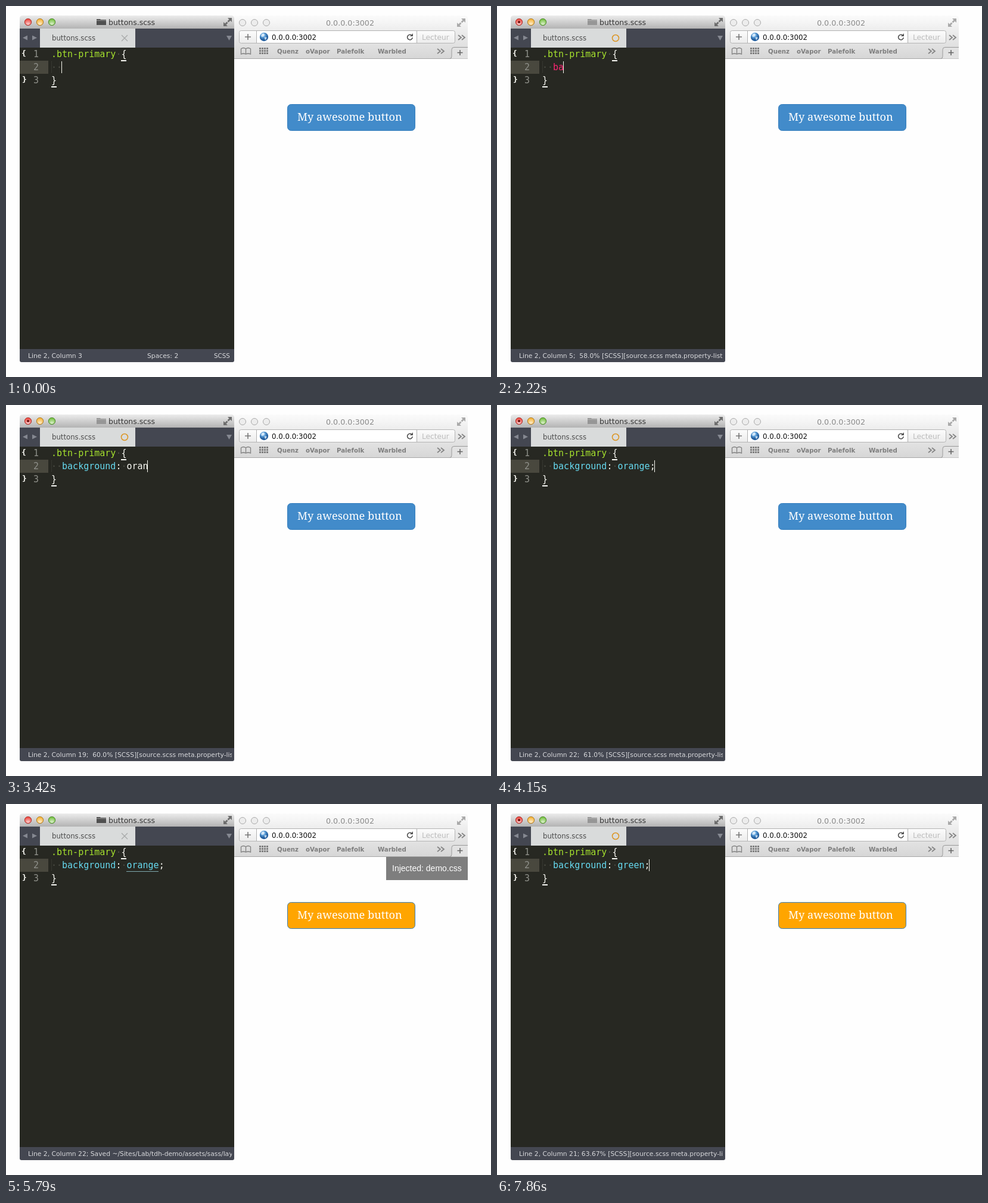
Animation, 814 px wide and 624 px high, one loop 8 s. Source, as an HTML page:

```html
<!DOCTYPE html>
<html lang="en">
<head>
<meta charset="utf-8">
<title>Live style injection</title>
<style>
  html, body { margin: 0; width: 100%; height: 100%; overflow: hidden; background: #fefefe; }
  svg { display: block; width: 814px; height: 624px; }
  text { white-space: pre; font-family: "DejaVu Sans", sans-serif; }
  .code text { font: 15px "DejaVu Sans Mono", monospace; fill: #f8f8f2; }
  .code .num { fill: #8f908a; }
  .code .fold { font-weight: bold; font-size: 13px; }
  .code .dot { fill: #4c4d45; }
  .sel { fill: #a6e22e; }
  .status { font-size: 10.75px; fill: #d8d9dc; }
  .marks { font-size: 10.2px; font-weight: bold; fill: #7d7d7d; }
  .line { fill: none; stroke: #808080; }
</style>
</head>
<body>
<svg viewBox="0 0 814 624">
  <defs>
    <linearGradient id="bar" x2="0" y2="1"><stop stop-color="#ececec"/><stop offset="1" stop-color="#b3b3b3"/></linearGradient>
    <linearGradient id="chrome" x2="0" y2="1"><stop stop-color="#fbfbfb"/><stop offset=".35" stop-color="#ededed"/><stop offset="1" stop-color="#d6d6d6"/></linearGradient>
    <linearGradient id="pill" x2="0" y2="1"><stop stop-color="#fcfcfc"/><stop offset="1" stop-color="#ececec"/></linearGradient>
    <radialGradient id="globe" cx=".4" cy=".3"><stop stop-color="#cfe6fa"/><stop offset=".5" stop-color="#5c9fd9"/><stop offset="1" stop-color="#245f9f"/></radialGradient>
    <radialGradient id="gloss" cy=".85" r=".8"><stop stop-color="#fff" stop-opacity=".75"/><stop offset="1" stop-color="#fff" stop-opacity="0"/></radialGradient>
    <path id="expand" d="M0-7h7v7l-2.5-2.5-3 3-2-2 3-3zM0 7h-7v-7l2.5 2.5 3-3 2 2-3 3z"/>
    <path id="more" d="M-6-4l5 4-5 4M0-4l5 4-5 4" fill="none" stroke="#858585" stroke-width="1.8"/>
    <clipPath id="statusClip"><path d="M23 577h356v22h-356z"/></clipPath>
  </defs>

  <!-- Browser -->
  <path d="M383 89V16H770q5 0 5 5V89z" fill="url(#chrome)"/>
  <path d="M383 88.5H775" stroke="#a6a6a6"/>
  <g fill="#ededed" stroke="#aaa">
    <circle cx="397" cy="28" r="5.5"/><circle cx="417" cy="28" r="5.5"/><circle cx="437" cy="28" r="5.5"/>
  </g>
  <text x="537" y="33" font-size="12.7" fill="#8b8b8b">0.0.0.0:3002</text>
  <use href="#expand" x="764" y="28" fill="#aaa"/>
  <rect x="391.5" y="41.5" width="362" height="21" rx="3" fill="url(#pill)" stroke="#b4b4b4"/>
  <path d="M421 42h269v20h-269z" fill="#fff"/>
  <path d="M420.500 42v20M689.500 42v20M421 41.500h269" stroke="#b0b0b0"/>
  <path d="M401 52h10M406 47v10" stroke="#777" stroke-width="1.6"/>
  <circle cx="433" cy="52" r="7.200" fill="url(#globe)"/>
  <path d="M429 47l4-1 1 3-3 3-3-1zM434 52l4 1-2 4-2-1z" fill="#e4f1fc" opacity=".75"/>
  <text x="446" y="57" font-size="11.75" fill="#111">0.0.0.0:3002</text>
  <path d="M681 49.500a4.300 4.300 0 1 0 1.200 3.500" class="line" style="stroke:#555" stroke-width="1.700"/>
  <path d="M683 46v5h-5z" fill="#555"/>
  <text x="698" y="57" font-size="12.2" fill="#bdbdbd">Lecteur</text>
  <use href="#more" x="765" y="53"/>
  <path d="M402.500 72q-4-3-8 0v9q4-2 8 0q4-2 8 0v-9q-4-3-8 0v9" class="line" stroke-width="1.300"/>
  <path d="M425 71.500h16M425 75.500h16M425 79.500h16" class="line" stroke-width="3" stroke-dasharray="3 1"/>
  <g class="marks">
    <text x="455" y="80">Quenz</text><text x="503" y="80">oVapor</text>
    <text x="555" y="80">Palefolk</text><text x="624" y="80">Warbled</text>
  </g>
  <use href="#more" x="730" y="76"/>
  <path d="M745 88.500q3 0 3-4v-11q0-4 4-4h23v19z" fill="#e2e2e2"/>
  <path d="M745 88.500q3 0 3-4v-11q0-4 4-4h23" class="line" style="stroke:#999"/>
  <path d="M757.500 78.500h9M762 74v9" stroke="#666" stroke-width="1.600"/>

  <rect id="button" x="472.500" y="165.500" width="214" height="44" rx="6" stroke="#357ebd"/>
  <text x="489" y="193" fill="#fff" style="font:18.2px 'Noto Serif',serif">My awesome button</text>
  <g id="notice">
    <path d="M638 89h137v39h-137z"/>
    <text x="648" y="113" fill="#fff" style="font:14px 'Liberation Sans',Arial,sans-serif">Injected: demo.css</text>
  </g>

  <!-- Editor -->
  <path d="M23 38V21q0-5 5-5H378q5 0 5 5V38z" fill="url(#bar)"/>
  <path d="M23 38H383V70H23z" fill="#444751"/>
  <path d="M23 70H383V577H23z" fill="#272822"/>
  <path d="M23 577H383V596q0 3-3 3H26q-3 0-3-3z" fill="#444751"/>
  <g stroke-width=".9">
    <circle cx="37" cy="27" r="5.700" fill="#ee4a42" stroke="#a52f2a"/>
    <circle cx="57" cy="27" r="5.700" fill="#f5b53c" stroke="#a87420"/>
    <circle cx="77" cy="27" r="5.700" fill="#78c244" stroke="#48842a"/>
  </g>
  <g fill="url(#gloss)">
    <circle cx="37" cy="27" r="5"/><circle cx="57" cy="27" r="5"/><circle cx="77" cy="27" r="5"/>
  </g>
  <circle id="dirtyDot" cx="37" cy="27" r="2" fill="#6b0d0b"/>
  <g id="folder"><path d="M152 22h6l1 1h9v9h-16z"/><path d="M152 24.500h16" stroke="#c4c4c4" opacity=".6"/></g>
  <text x="172" y="32" font-size="12.5" fill="#333">buttons.scss</text>
  <use href="#expand" x="372" y="27" fill="#6d6d6d"/>
  <path d="M36 49.500v8l-8-4zM44 49.500v8l8-4zM370 50h9l-4.500 8z" fill="#858891"/>
  <path d="M57 38H217V70H57z" fill="#d9dbdb"/>
  <text x="77" y="58" font-size="11.7" fill="#4c4c4c">buttons.scss</text>
  <path id="close" d="M194 49l10 10M204 49l-10 10" stroke="#a5a7a7" stroke-width="1.200"/>
  <circle id="dirtyRing" cx="199" cy="54" r="5.500" fill="none" stroke="#dc9420" stroke-width="1.500"/>

  <path d="M23 92h48v22h-48z" fill="#49483e"/>
  <path d="M76.500 93v20" stroke="#45463e" stroke-dasharray="1 1"/>
  <g class="code">
    <text x="26" y="84" class="fold">{</text><text x="27" y="128" class="fold">}</text>
    <text x="46" y="86" class="num">1</text><text x="46" y="108" class="num">2</text><text x="46" y="130" class="num">3</text>
    <text x="76" y="86"><tspan class="sel">.btn-primary</tspan><tspan class="dot">·</tspan>{</text>
    <text x="76" y="108"><tspan class="dot">··</tspan><tspan id="prop"></tspan><tspan id="colon"></tspan><tspan id="gap" class="dot"></tspan><tspan id="value"></tspan><tspan id="semi"></tspan></text>
    <text x="76" y="130">}</text>
  </g>
  <path d="M193 92h9M76 136h9" stroke="#f8f8f2" stroke-width="2"/>
  <path id="underline" d="M202 113.500h54" stroke="#7fa9af"/>
  <path id="caret" d="M.5 93v20" stroke="#f8f8f0"/>
  <g class="status">
    <text id="status" x="37" y="592" clip-path="url(#statusClip)"></text>
    <g id="modes"><text x="237" y="592">Spaces: 2</text><text x="349" y="592" font-size="10.3">SCSS</text></g>
  </g>
</svg>
<script>
const LOOP = 8000, SAVE = 4160, EDIT = 6090, INJECT = 5040;
const $ = id => document.getElementById(id);
const prop = 'background: ';
const type = (word, count, times) =>
  times.map((t, i) => [t, prop + word.slice(0, i + 1), count + i]);

// time, line text, edit count
const edits = [
  [0, '', 0], [1930, 'b', 173], [2080, 'ba', 174], [2370, prop, 175], [2520, prop, 176],
  ...type('orange;', 177, [2970, 3120, 3270, 3420, 3570, 3710, 3860]),
  [EDIT, prop + 'orange', 184], [6230, prop, 185],
  ...type('green;', 186, [6680, 6830, 7270, 7420, 7560, 7860])
];
const blink = [
  [0, 1], [150, 0], [740, 1], [1040, .5], [1180, 0], [1630, .5], [1780, 1], [2820, .5], [2970, 1],
  [4300, .5], [4450, 0], [INJECT, 1], [5340, .5], [5490, 0], [5940, .5], [EDIT, 1],
  [6530, .5], [6680, 1], [7120, .5], [7270, 1]
];
const fills = [[0, '#428bca'], [INJECT, '#949770'], [5190, '#ffa500']];
const notices = [[0, 0], [INJECT, 1], [5790, .5], [5940, 0]];
const at = (list, t) => list.findLast(step => step[0] <= t);
const show = (id, on) => $(id).style.opacity = +on;

function percent(count) {
  const n = +(count / 3).toFixed(2);
  return (Number.isInteger(n) ? n + '.0' : String(n)).padStart(5);
}

function drawLine(text) {
  const [name, rest] = text.split(': ');
  const full = rest !== undefined;
  const word = (rest || '').replace(';', '');
  $('prop').textContent = name;
  $('prop').style.fill = full ? '#66d9ef' : '#f92672';
  $('colon').textContent = full ? ':' : '';
  $('gap').textContent = full ? '·' : '';
  $('value').textContent = word;
  $('value').style.fill = /^(orange|green)$/.test(word) ? '#66d9ef' : '#f8f8f2';
  $('semi').textContent = text.endsWith(';') ? ';' : '';
  $('caret').setAttribute('transform', `translate(${Math.floor(93 + text.length * 9.03)})`);
}

function draw(t) {
  const [, text, count] = at(edits, t);
  const saved = t >= SAVE && t < EDIT;
  const dirty = count > 0 && !saved;
  drawLine(text);
  show('caret', at(blink, t)[1]);
  show('underline', saved);
  show('dirtyDot', dirty);
  show('dirtyRing', dirty);
  show('close', !dirty);
  show('modes', !count);
  $('folder').style.fill = dirty ? '#969696' : '#505050';
  $('status').textContent = `Line 2, Column ${text.length + 3}` + (
    saved ? '; Saved ~/Sites/Lab/tdh-demo/assets/sass/layout/buttons.scss (UTF-8)'
    : count ? `; ${percent(count)}% [SCSS][source.scss meta.property-list.scss]` : '');
  $('button').style.fill = at(fills, t)[1];
  show('notice', at(notices, t)[1]);
}

const start = performance.now();
function frame() {
  draw((performance.now() - start) % LOOP);
  requestAnimationFrame(frame);
}
frame();
</script>
</body>
</html>
```
